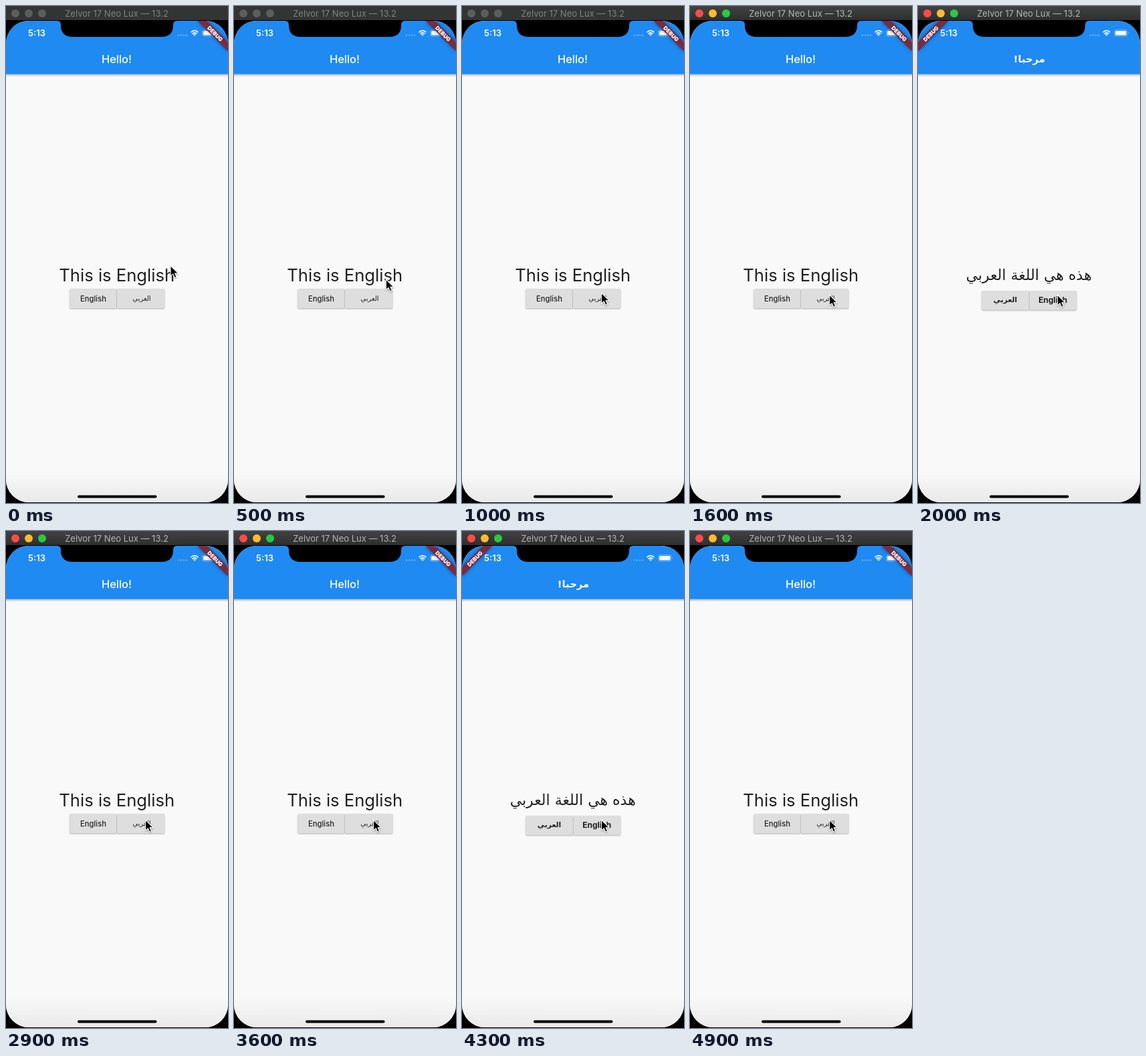
These frames come from a looping animation (332x740 px, 5000 ms). An HTML page:

```html
<!DOCTYPE html>
<html lang="en">
<head>
<meta charset="utf-8">
<title>Language switch</title>
<style>
  html, body { margin: 0; width: 100%; height: 100%; overflow: hidden; background: #000; }
  svg { display: block; width: 332px; height: 740px; }
  text { font-family: Inter, Roboto, sans-serif; text-anchor: middle; }
  .ar { font-family: "DejaVu Sans", sans-serif; direction: rtl; }
  .ink { fill: #212121; }
  .button { fill: #dedede; filter: drop-shadow(0 1px 1px rgba(0, 0, 0, .3)); }
  .ribbon { fill: #782c40; filter: drop-shadow(0 0 2.4px rgba(0, 0, 0, .5)); }
  .debug { font-size: 8.2px; font-weight: 900; fill: #fff; }
</style>
</head>
<body>
<svg viewBox="0 0 332 740" xmlns="http://www.w3.org/2000/svg">
  <defs>
    <linearGradient id="barActive" x2="0" y2="1">
      <stop stop-color="#424242"/><stop offset="1" stop-color="#2f2f2f"/>
    </linearGradient>
    <linearGradient id="floor" x2="0" y2="1">
      <stop stop-color="#f9f9f9"/><stop offset="1" stop-color="#e9e9e9"/>
    </linearGradient>
    <linearGradient id="barShadow" x2="0" y2="1">
      <stop stop-color="#000" stop-opacity=".22"/><stop offset="1" stop-color="#000" stop-opacity="0"/>
    </linearGradient>
    <clipPath id="screen"><rect y="22" width="332" height="717" rx="34"/></clipPath>
  </defs>

  <rect width="332" height="740"/>
  <rect id="titleBar" width="332" height="21"/>
  <g id="lights">
    <circle cx="14" cy="11" r="6"/><circle cx="34" cy="11" r="6"/><circle cx="54" cy="11" r="6"/>
  </g>
  <text id="title" x="165.5" y="16" font-size="13">Zelvor 17 Neo Lux — 13.2</text>

  <g clip-path="url(#screen)">
    <rect y="22" width="332" height="718" fill="#f9f9f9"/>
    <rect y="694" width="332" height="46" fill="url(#floor)"/>
    <rect y="101.6" width="332" height="4" fill="url(#barShadow)"/>
    <rect y="22" width="332" height="79.6" fill="#1f8af2"/>

    <text x="46" y="45" font-size="13" font-weight="600" fill="#fff">5:13</text>
    <g fill="#fff" opacity=".35">
      <circle cx="258" cy="43.5" r="1.2"/><circle cx="262" cy="43.5" r="1.2"/>
      <circle cx="266" cy="43.5" r="1.2"/><circle cx="270" cy="43.5" r="1.2"/>
    </g>
    <g fill="none" stroke="#fff" stroke-width="1.8">
      <path d="M276.5 39.2Q282 34 287.5 39.2M278.6 41.6Q282 38.4 285.4 41.6"/>
      <path d="M280.2 42.8Q282 41.4 283.8 42.8L282 44.8Z" fill="#fff" stroke="none"/>
    </g>
    <rect x="293.5" y="35.5" width="19.5" height="9.5" rx="2.8" fill="none" stroke="#fff" stroke-opacity=".35"/>
    <rect x="295" y="37" width="16.5" height="6.5" rx="1.5" fill="#fff"/>
    <path d="M314.2 38.7Q316 40.2 314.2 41.8Z" fill="#fff" opacity=".5"/>

    <g id="english">
      <text x="165.5" y="85" font-size="16.4" font-weight="500" fill="#fff">Hello!</text>
      <text class="ink" x="165.7" y="410" font-size="25.6">This is English</text>
      <rect class="button" x="95.5" y="421" width="70" height="29" rx="1.6"/>
      <rect class="button" x="166" y="421" width="71" height="29" rx="1.6"/>
      <text class="ink" x="130.5" y="439.6" font-size="11.2" font-weight="500">English</text>
      <text class="ar ink" x="203" y="438.5" font-size="10">العربي</text>
      <path class="ribbon" d="M286.6 22H300.2L332 53.8V67.4Z"/>
      <text class="debug" transform="translate(312.7 41.3) rotate(45)" y="3">DEBUG</text>
    </g>

    <g id="arabic">
      <text class="ar" x="166.5" y="84" font-size="14.8" font-weight="700" fill="#fff">مرحبا!</text>
      <text class="ar ink" x="165.7" y="408" font-size="22">هذه هي اللغة العربي</text>
      <rect class="button" x="95.5" y="424" width="71" height="28.5" rx="1.6"/>
      <rect class="button" x="167" y="424" width="70" height="28.5" rx="1.6"/>
      <text class="ar ink" x="130.5" y="441" font-size="10.8" font-weight="700">العربي</text>
      <text class="ink" x="201.7" y="442.3" font-size="12" font-weight="700">English</text>
      <path class="ribbon" d="M45.4 22H31.8L0 53.8V67.4Z"/>
      <text class="debug" transform="translate(19.3 41.3) rotate(-45)" y="3">DEBUG</text>
    </g>

    <path d="M76 21V22Q82 22 82 28V29Q82 46 100 46H232Q250 46 250 29V28Q250 22 256 22V21Z"/>
    <rect x="107" y="728.5" width="118.5" height="4" rx="2"/>
  </g>

  <path id="cursor" d="M0 0V16L3.8 12.6L6.3 18.2L9 17L6.6 11.6H11.6Z" stroke="#fff" stroke-width="1.1"
        stroke-linejoin="round" style="filter: drop-shadow(0 1px 1px rgba(0, 0, 0, .35))"/>
</svg>
<script>
  const LOOP = 5000, STEP = 100, ACTIVE_AT = 1400;
  const arabicSpans = [[1800, 2600], [3700, 4700]];
  // time, x, y of the pointer tip
  const path = [[0, 246, 386.5], [100, 246, 386.5], [900, 208.5, 427], [1200, 208.5, 427], [1400, 208.5, 430], [LOOP, 208.5, 430]];
  const lightColors = ["#fc4b48", "#fdbc2e", "#2ac840"];

  const el = id => document.getElementById(id);
  const show = (id, on) => el(id).setAttribute("visibility", on ? "visible" : "hidden");

  function pointer(t) {
    const i = path.findIndex(p => p[0] > t);
    const [t0, x0, y0] = path[i - 1], [t1, x1, y1] = path[i];
    const u = (t - t0) / (t1 - t0), k = u * u * (3 - 2 * u);
    return [x0 + (x1 - x0) * k, y0 + (y1 - y0) * k];
  }

  function draw(now) {
    const t = Math.floor((now % LOOP) / STEP) * STEP;
    const active = t >= ACTIVE_AT;
    const arabic = arabicSpans.some(([from, to]) => t >= from && t < to);
    show("english", !arabic);
    show("arabic", arabic);
    el("titleBar").setAttribute("fill", active ? "url(#barActive)" : "#343434");
    el("title").setAttribute("fill", active ? "#b4b4b4" : "#818181");
    [...el("lights").children].forEach((c, i) => c.setAttribute("fill", active ? lightColors[i] : "#5d5d5d"));
    el("cursor").setAttribute("transform", `translate(${pointer(t)})`);
  }

  const start = performance.now();
  function tick() {
    draw(performance.now() - start);
    requestAnimationFrame(tick);
  }
  tick();
</script>
</body>
</html>
```
